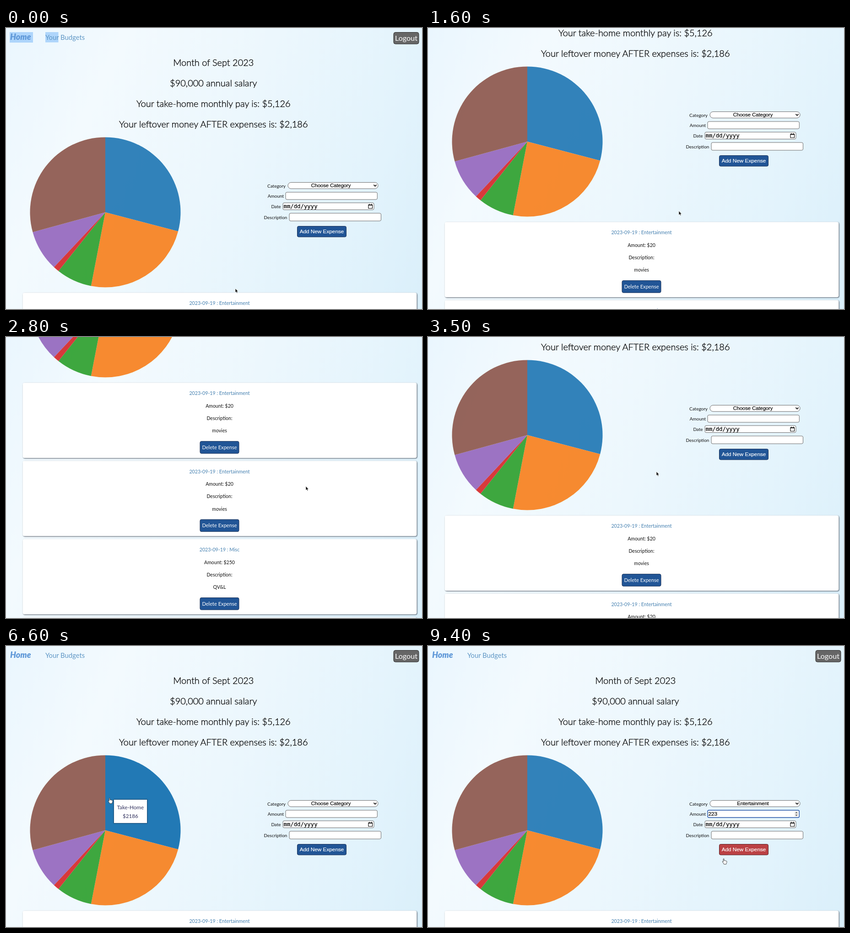
An HTML page that plays this animation: 909 px wide and 616 px high, repeating every 9.5 s.

```html
<!DOCTYPE html>
<html lang="en">
<head>
<meta charset="utf-8">
<title>Monthly budget</title>
<style>
html, body { margin: 0; width: 100%; height: 100%; overflow: hidden; }
#stage { position: relative; width: 909px; height: 616px; overflow: hidden;
  background: linear-gradient(115deg, #eaf6fe 0%, #f3fafe 22%, #ecf7fd 50%, #e2f3fc 80%, #daeffa 100%); }
svg { position: absolute; left: 0; top: 0; }
text { font-family: Lato, sans-serif; font-weight: 300; fill: #111; white-space: pre; }
.title { fill: #000; stroke: #000; stroke-width: .35; }
.arial { font-family: "Liberation Sans", Arial, sans-serif; font-weight: 400; fill: #000; stroke: #000; stroke-width: .2; }
.mono { font-family: "DejaVu Sans Mono", monospace; font-weight: 400; fill: #000; stroke: #000; stroke-width: .2; }
.nav { font-weight: 400; fill: #5f97c6; }
.home { font-weight: 900; font-style: italic; fill: #5f98d8; }
.date { font-weight: 400; fill: #4580b0; }
.small { font-weight: 400; }
.white { fill: #fff; font-weight: 400; }
.arial.white { stroke: #fff; }
.card { fill: #fff; filter: drop-shadow(1px 1px 1px rgba(30, 40, 55, .8)); }
.field { fill: #fff; stroke: #6c6c6c; }
.focus { stroke: #2253a6; stroke-width: 1.4; }
.btn { fill: #215596; stroke: #1a3157; }
.hot { fill: #bb4144; stroke: #5a2226; }
#tip { position: absolute; left: 0; top: 0; box-sizing: border-box; min-width: 66px; padding: 6.5px;
  background: #fff; box-shadow: 0 0 2px 1px rgba(40, 50, 70, .65); color: #33335f; text-align: center;
  font: 400 11.7px/19px Lato, sans-serif; white-space: pre; }
</style>
</head>
<body>
<div id="stage">
  <svg id="page" width="909" height="616"><g id="scroll"></g></svg>
  <div id="tip"></div>
  <svg width="909" height="616"><g id="cursor">
    <path id="arrow" d="M0 0V9L2 7.2L3.5 10.2L5 9.5L3.7 6.7H6.3Z" fill="#111" stroke="#fff" stroke-width=".7"/>
    <path id="hand" d="M2.2 1.2C2.2-.2 4-.2 4 1.2V4.5C5 3.8 6 4 6.2 4.9C7.2 4.3 8 4.6 8.2 5.4C9.4 5 10 5.6 10 6.6C10 9.6 9 10 8.6 12.3H3.6C3 10.3 1.5 9 .3 7.2C-.2 6.2 1.2 5.8 2.2 7.2Z"
      fill="#fff" stroke="#333" stroke-width=".9"/>
  </g></svg>
</div>
<script>
const LOOP = 9500, STEP = 100;
const CX = 217, CY = 404, R = 164.5;
const $ = id => document.getElementById(id);
const root = $('scroll');

function add(tag, attrs, content = '') {
  const el = document.createElementNS('http://www.w3.org/2000/svg', tag);
  for (const k in attrs) el.setAttribute(k, attrs[k]);
  el.textContent = content;
  return root.appendChild(el);
}
const text = (s, x, y, size, cls = '', anchor = 'middle') =>
  add('text', { x, y, 'font-size': size, class: cls, 'text-anchor': anchor }, s);
const rect = (x, y, width, height, rx, cls) =>
  add('rect', { x, y, width, height, rx, class: cls });

// Header
const marks = [rect(8, 9, 51, 23, 0, ''), rect(86, 9, 28.5, 22.5, 0, '')];
marks.forEach(m => m.setAttribute('fill', '#aed5fb'));
text('Home', 9, 26.3, 18, 'home', 'start');
text('Your Budgets', 86, 26, 14.8, 'nav', 'start');
add('rect', { x: 847, y: 9.5, width: 55, height: 25.5, rx: 4, fill: '#666', stroke: '#2c2c2c' });
text('Logout', 874.5, 28, 16.2, 'white');
['Month of Sept 2023', '$90,000 annual salary', 'Your take-home monthly pay is: $5,126',
 'Your leftover money AFTER expenses is: $2,186']
  .forEach((s, i) => text(s, 453.3, 83.3 + i * 45, 19.95, 'title'));

// Pie
const slices = [
  ['Take-Home', 2186, '#1f77b4'], ['Rent', 1800, '#f8801c'], ['Groceries', 575, '#2ca02c'],
  ['Entertainment', 95, '#d62728'], ['Transportation', 660, '#9467bd'], ['Misc', 2200, '#8c564b']
].map(([name, value, fill]) => ({ name, value, fill }));
const total = slices.reduce((sum, s) => sum + s.value, 0);
const rim = a => `${CX + R * Math.sin(a)} ${CY - R * Math.cos(a)}`;
let angle = 0;
for (const s of slices) {
  const from = angle;
  s.end = angle += s.value / total * 2 * Math.PI;
  s.el = add('path', { d: `M${CX} ${CY}L${rim(from)}A${R} ${R} 0 0 1 ${rim(s.end)}Z`, fill: s.fill });
}
function sliceAt(x, y) {
  const dx = x - CX, dy = y - CY;
  if (Math.hypot(dx, dy) > R) return null;
  const a = (Math.atan2(dx, -dy) + 2 * Math.PI) % (2 * Math.PI);
  return slices.find(s => a < s.end);
}

// Form
[['Category', 591, 349.5], ['Amount', 589.5, 372], ['Date', 590, 395], ['Description', 589, 419]]
  .forEach(([s, x, y]) => text(s, x, y, 10, 'small'));
const select = rect(616, 338.5, 197, 13.8, 6.9, 'field');
const choice = text('', 710, 349.3, 11.15, 'arial');
add('path', { d: 'M803.5 343.7L806.5 346.8L809.5 343.7', fill: 'none', stroke: '#111', 'stroke-width': 1.7 });
const amount = rect(611, 360, 200.3, 16, 3, 'field');
const digits = text('', 612.5, 372.2, 11.8, 'arial', 'start');
const spinner = add('g', {});
spinner.innerHTML = '<rect x="800.5" y="361.5" width="9" height="13" rx="2" fill="#eee"/>' +
  '<path d="M802.6 366.5L805 363.5L807.4 366.5ZM802.6 369.8L805 372.8L807.4 369.8Z" fill="#555"/>';
rect(605, 383.2, 199, 15.3, 3, 'field');
text('mm/dd/yyyy', 606.5, 395, 12.3, 'mono', 'start');
add('path', { d: 'M792 387.5H800.5V395.5H792ZM792 388.3H800.5M794 385.5V388M798.5 385.5V388',
  fill: 'none', stroke: '#111', 'stroke-width': 1.2 });
rect(619, 406, 200.5, 17, 3, 'field');
const submit = rect(636.5, 434.5, 107, 23.5, 3, 'btn');
text('Add New Expense', 690, 450.2, 11.75, 'arial white');

// Expense cards
[['Entertainment', '$20', 'movies'], ['Entertainment', '$20', 'movies'],
 ['Misc', '$250', 'QV&L'], ['Misc', '$250', 'phone']].forEach(([kind, cost, note], i) => {
  const y = 580.2 + i * 171.4, x = 466.5;
  rect(36.5, y, 861, 165, 4, 'card');
  text(`2023-09-19 : ${kind}`, x, y + 27.2, 10.65, 'date');
  text(`Amount: ${cost}`, x, y + 54.5, 10.5, 'small');
  text('Description:', x, y + 81.8, 10.5, 'small');
  text(note, x, y + 109.2, 10.5, 'small');
  rect(424, y + 128.5, 85, 26.5, 3, 'btn');
  text('Delete Expense', x, y + 145.6, 11.1, 'white');
});

// Timelines: [time, ...values]
const scrollKeys = [[700, 0], [1600, 155], [2400, 420], [2800, 480], [3000, 480], [3500, 189], [3900, 0]];
const pointerKeys = [
  [0, 501, 571], [500, 501, 571], [1600, 548, 401], [2400, 645, 335], [2800, 655, 327], [3100, 640, 320],
  [3500, 499, 295], [3900, 330, 300], [4200, 195, 330], [4600, 133, 416], [4700, 138, 423], [4900, 120, 452],
  [5100, 108, 475], [5300, 125, 505], [5500, 165, 512], [5800, 250, 490], [6000, 300, 455], [6200, 280, 390],
  [6500, 223, 333], [6600, 223, 333], [7000, 640, 340], [7300, 702, 343], [7900, 702, 345], [8300, 690, 365],
  [8900, 690, 365], [9200, 660, 445], [9400, 643, 466]
];
function sample(keys, t) {
  let i = keys.findIndex(k => k[0] > t);
  if (i < 0) i = keys.length;
  if (i === 0 || i === keys.length) return keys[Math.max(0, i - 1)].slice(1);
  const [a, b] = [keys[i - 1], keys[i]], p = (t - a[0]) / (b[0] - a[0]);
  return a.slice(1).map((v, j) => v + (b[j + 1] - v) * p);
}

const show = (el, on) => { el.style.display = on ? '' : 'none'; };
const place = (el, x, y) => { el.style.transform = `translate(${x}px, ${y}px)`; };

function draw(t) {
  const [top] = sample(scrollKeys, t), [x, y] = sample(pointerKeys, t);
  place(root, 0, -top);
  place($('cursor'), x, y);
  marks.forEach(m => show(m, t < 400));

  // Hover trails the pointer by one step
  const [hx, hy] = sample(pointerKeys, t - STEP);
  const hit = sliceAt(hx, hy + top);
  slices.forEach(s => s.el.setAttribute('opacity', s === hit ? 0.985 : 0.91));
  show($('tip'), hit);
  if (hit) {
    $('tip').textContent = `${hit.name}\n$${hit.value}`;
    place($('tip'), hx + 13, hy + 4);
  }

  const onButton = t >= 9200, hand = hit || onButton;
  show($('hand'), hand);
  show($('arrow'), !hand);
  submit.classList.toggle('hot', onButton);
  choice.textContent = t < 7900 ? 'Choose Category' : 'Entertainment';
  select.classList.toggle('focus', t >= 7300 && t < 8300);
  amount.classList.toggle('focus', t >= 8300);
  show(spinner, t >= 8300);
  digits.textContent = '223'.slice(0, [8600, 8800, 8900].filter(k => t >= k).length);
}

function tick() {
  draw(Math.floor(performance.now() % LOOP / STEP) * STEP);
  requestAnimationFrame(tick);
}
tick();
</script>
</body>
</html>
```
